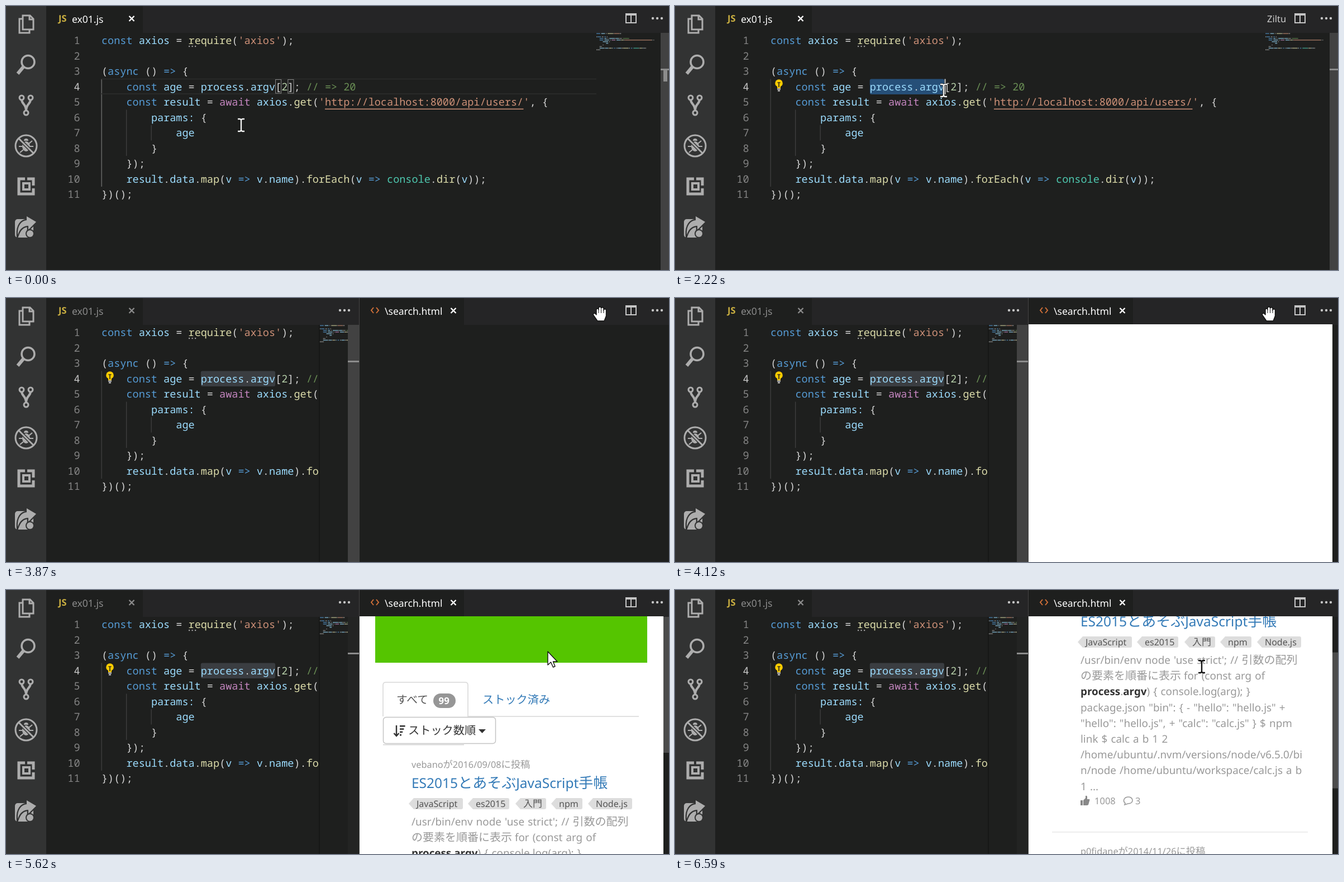
Write an HTML page with a canvas that moves like this. It is 1187 px wide and 472 px high and loops after 6650 ms.

```html
<!DOCTYPE html>
<html lang="ja">
<head>
<meta charset="utf-8">
<title>Editor search</title>
<style>
html, body { margin: 0; width: 100%; height: 100%; overflow: hidden; background: #1e1f1e; }
canvas { display: block; }
</style>
</head>
<body>
<canvas id="stage" width="1187" height="472"></canvas>
<script>
const ctx = document.getElementById('stage').getContext('2d');
const W = 1187, H = 472, LOOP = 6650;
const X0 = 171, CW = 11.11, TOP = 48, LINE = 27.5;
const BG = '#1e1f1e', BAR = '#252526', SIDE = '#323333', ICON = '#adadad';
const GREY = '#999', LINK = '#3794ff', BLUE = '#337ab7';
const MONO = '"Noto Sans Mono", "DejaVu Sans Mono", monospace';
const SANS = '"Noto Sans", "Open Sans", sans-serif';
const CJK = '"Noto Sans CJK JP", "Noto Sans CJK", sans-serif';

// ---------- code ----------
const source = `const axios = require('axios');

(async () => {
    const age = process.argv[2]; // => 20
    const result = await axios.get('http://localhost:8000/api/users/', {
        params: {
            age
        }
    });
    result.data.map(v => v.name).forEach(v => console.dir(v));
})();`.split('\n');
const TOKEN = /(\/\/.*)|('[^']*')|(const|async|=>)|(await)|(console)|(\w+(?=\())|(\d+)|([a-z]\w*:?)|(\S)/gi;
const palette = ['#6a8f55', '#ce9178', '#569cd6', '#c586c0', '#4ec9b0', '#dcdcaa', '#b5cea8', '#9cdcfe', '#d4d4d4'];
const tokens = source.flatMap((line, row) => [...line.matchAll(TOKEN)].map(m => ({
  row, col: m.index, text: m[0], color: palette[m.slice(1).findIndex(g => g !== undefined)]
})));
const rowTop = row => TOP + row * LINE;
const baseline = row => Math.round(rowTop(row) + 20);

// ---------- timing ----------
const bursts = [[90, 640, 8], [780, 1440, 10], [1530, 1580, 2], [1760, 1760, 1], [1910, 1970, 2],
  [2220, 2840, 9], [2910, 3530, 8], [3620, 3620, 1], [4980, 5620, 9], [5710, 6320, 9], [6410, 6590, 3]];
const mousePath = [[20, 421, 213], [640, 353, 151], [780, 353, 151], [1073, 412, 151], [1147, 414, 151],
  [1440, 463, 148], [1580, 474, 148], [1910, 476, 148], [1970, 478, 149], [2100, 478, 150], [2220, 481, 151],
  [2840, 995, 73], [3530, 1062, 16], [4980, 1062, 16], [5620, 970, 110], [6320, 947, 125], [6590, 943, 137]];
const scrollPath = [[5640, 0], [6320, 289]];
const shapes = [[0, 'beam'], [3000, 'arrow'], [3300, 'hand'], [3620, 'arrow'], [3870, 'hand'],
  [5050, 'arrow'], [6100, 'beam']];

function captured(t) {
  let out = 0;
  for (const [a, b, n] of bursts) {
    if (t < a) break;
    const d = n > 1 ? (b - a) / (n - 1) : 1;
    out = Math.min(b, a + Math.floor((t - a) / d + 1e-6) * d);
  }
  return out;
}

function along(path, t) {
  if (t <= path[0][0]) return path[0].slice(1);
  for (let i = 1; i < path.length; i++) {
    const [p, q] = [path[i - 1], path[i]];
    if (t <= q[0]) {
      const k = (t - p[0]) / (q[0] - p[0]);
      return q.slice(1).map((v, j) => p[j + 1] + (v - p[j + 1]) * k);
    }
  }
  return path[path.length - 1].slice(1);
}

// ---------- drawing helpers ----------
function rect(x, y, w, h, color) {
  ctx.fillStyle = color;
  ctx.fillRect(x, y, w, h);
}
function round(x, y, w, h, r, fill, stroke) {
  ctx.beginPath();
  ctx.roundRect(x, y, w, h, r);
  if (fill) { ctx.fillStyle = fill; ctx.fill(); }
  if (stroke) { ctx.strokeStyle = stroke; ctx.lineWidth = 1.5; ctx.stroke(); }
}
function dot(x, y, r, color) {
  ctx.fillStyle = color;
  ctx.beginPath();
  ctx.arc(x, y, r, 0, 7);
  ctx.fill();
}
function stroke(d, color, width) {
  ctx.strokeStyle = color;
  ctx.lineWidth = width;
  ctx.stroke(new Path2D(d));
}
function fill(d, color) {
  ctx.fillStyle = color;
  ctx.fill(new Path2D(d));
}
function clipped(x, y, w, h, draw) {
  ctx.save();
  ctx.beginPath();
  ctx.rect(x, y, w, h);
  ctx.clip();
  draw();
  ctx.restore();
}
// Mixed Latin and Japanese text centred on y; returns the right edge.
function label(s, x, y, size, color, { bold = false, link = false } = {}) {
  const base = Math.round(y + size * 0.35), start = x;
  ctx.fillStyle = color;
  ctx.wordSpacing = `${size * 0.06}px`;
  for (const run of s.match(/[\u3000-\u9fff]+|[^\u3000-\u9fff]+/g)) {
    const wide = run[0] >= '\u3000';
    const px = wide ? size : size * (bold ? 0.99 : 0.943);
    ctx.font = `${bold ? 'bold ' : ''}${px}px ${wide ? CJK : SANS}`;
    ctx.fillText(run, x, base);
    x += ctx.measureText(run).width;
  }
  ctx.wordSpacing = '0px';
  if (link) rect(start, base + Math.round(size * 0.12), x - start, Math.max(1.3, size * 0.08), color);
  return x;
}
function cross(x, color) {
  stroke(`M${x - 4.5} 18l9 9m0-9l-9 9`, color, 2.4);
}
function more(x) {
  for (const dx of [-8, 0, 8]) dot(x + dx, 22, 2.2, '#c5c5c5');
}

// ---------- activity bar ----------
function activityBar() {
  rect(0, 0, 72, H, SIDE);
  stroke('M30 23H24V48H42V43M30 17H43L49 23V42H30ZM42 17V24H49', ICON, 3);
  stroke('M51 100a11.5 11.5 0 1 1-23 0a11.5 11.5 0 1 1 23 0', ICON, 3.5);
  stroke('M31 109L21 121', ICON, 6);
  stroke('M28 167C28 176 36 174 36 188M44 167C44 176 36 174 36 188', ICON, 4);
  for (const [x, y] of [[28, 164], [44, 164], [36, 191]]) {
    dot(x, y, 5.5, ICON);
    dot(x, y, 2.4, SIDE);
  }
  fill('M29 251a7 9 0 1 1 14 0a7 9 0 1 1-14 0M32 241a4 4 0 0 1 8 0z', ICON);
  stroke('M23 251H49M25 241L31 246M47 241L41 246M25 262L31 257M47 262L41 257', ICON, 2.2);
  stroke('M23 237L49 263', SIDE, 6);
  stroke('M22.5 236.5L49.5 263.5M55 250a19 19 0 1 1-38 0a19 19 0 1 1 38 0', ICON, 3);
  stroke('M34 309H23V336H34M30 336H49V326M38 309H49V321', ICON, 5);
  stroke('M31 317H42V328H31Z', ICON, 4);
  round(16, 381, 33, 33, 5, ICON);
  const arrow = 'M37 376L54 386L40 400V393C31 393 25 398 21 409C20 393 27 384 37 383Z';
  stroke(arrow, SIDE, 4.5);
  fill(arrow, ICON);
  dot(43, 407, 8, SIDE);
  dot(43, 407, 6, ICON);
}

// ---------- editor ----------
function tabs(split, selecting) {
  rect(72, 0, W - 72, TOP, BAR);
  rect(72, 0, 173, TOP, BG);
  label('JS', 94, 22, 16.5, '#cbb041', { bold: true });
  label('ex01.js', 118, 23, 18.6, split ? '#8b8b8b' : '#fff');
  cross(225, split ? '#8b8b8b' : '#fff');
  if (split) {
    more(606);
    rect(633, 0, 187, TOP, BG);
    stroke('M658 17L654 22L658 27M663 17L667 22L663 27', '#d07038', 2);
    label('\\search.html', 678, 23, 18.6, '#fff');
    cross(801, '#fff');
  } else if (selecting) {
    label('Ziltu', 1060, 23, 17.5, '#ccc');
  }
  stroke('M1110 14H1128V30H1110ZM1119 14V30', '#c5c5c5', 2);
  rect(1109, 13, 20, 4, '#c5c5c5');
  more(1166);
}

function guides(active) {
  rect(170.5, rowTop(3), 1.3, LINE * 7, active ? '#707070' : '#404040');
  rect(215, rowTop(5), 1.3, LINE * 3, '#404040');
  rect(259.5, rowTop(6), 1.3, LINE, '#404040');
}

function code(t, sel, split) {
  const idle = !sel, y = rowTop(3);
  guides(idle);
  if (idle) {
    rect(X0, y - 1, 886, 2, '#292a29');
    rect(X0, y + LINE - 2, 886, 2, '#292a29');
    if (t < 780) for (const col of [28, 30]) {
      ctx.strokeStyle = '#888';
      ctx.lineWidth = 1;
      ctx.strokeRect(X0 + col * CW + 0.5, y + 1, CW - 1, LINE - 3);
    }
  } else {
    round(X0 + 16 * CW, y, sel * CW, LINE, 3, split ? '#3a3d41' : '#264f78');
  }
  ctx.font = `18.5px ${MONO}`;
  for (const k of tokens) {
    ctx.fillStyle = k.color;
    ctx.fillText(k.text, X0 + k.col * CW, baseline(k.row));
  }
  rect(X0 + 36 * CW, 183.5, 32 * CW, 1.5, '#ce9178');
  for (let i = 0; i < 3; i++) rect(327 + i * 5.5, 71, 2.2, 2.2, '#a0a0a0');
  const caretOn = t < 2910 || t > 3400;
  if (sel && !split && caretOn) rect(X0 + (16 + sel) * CW + 0.5, y, 2, LINE, '#c8c8c8');
  if (t >= 2220) bulb();
}

function bulb() {
  dot(186, 138, 6.8, '#ffcc00');
  rect(183, 142, 6, 5, '#ffcc00');
  stroke('M183.5 137H188.5M186 138V145', BG, 1.6);
  stroke('M183 148.5H189M184 151.5H188', '#d4d4d4', 1.8);
}

function lineNumbers() {
  ctx.font = `18.5px ${MONO}`;
  ctx.textAlign = 'right';
  source.forEach((_, i) => {
    ctx.fillStyle = i === 3 ? '#c6c6c6' : '#858585';
    ctx.fillText(i + 1, 132.5, baseline(i));
  });
  ctx.textAlign = 'left';
}

function minimap(x) {
  ctx.globalAlpha = 0.65;
  for (const k of tokens) rect(x + k.col * 1.44, 48.5 + k.row * 2.9, k.text.length * 1.44 - 0.4, 1.6, k.color);
  ctx.globalAlpha = 1;
}

function editor(t, sel, split) {
  const right = split ? 562 : 1057, ruler = split ? 612 : 1172;
  const rulerWidth = split ? 20 : 15;
  lineNumbers();
  clipped(72, TOP, right - 72, H - TOP, () => code(t, sel, split));
  if (split) rect(560, TOP, 2, H - TOP, '#171817');
  clipped(right, TOP, ruler - right, H - TOP, () => minimap(right));
  rect(ruler, TOP, rulerWidth, H - TOP, t < 4520 ? '#424242' : '#232423');
  rect(ruler, 112, rulerWidth, 3, '#8c8c8c');
  if (!sel) rect(1177, 115, 7, 20, '#8c8c8c');
}

// ---------- preview ----------
const title = ['ES2015とあそぶJavaScript', '手帳'];
const excerpt = ["/usr/bin/env node 'use strict'; // 引数の配列", 'の要素を順番に表示 for (const arg of', '',
  'package.json "bin": { - "hello": "hello.js" +', '"hello": "hello.js", + "calc": "calc.js" } $ npm',
  'link $ calc a b 1 2', '/home/ubuntu/.nvm/versions/node/v6.5.0/bi',
  'n/node /home/ubuntu/workspace/calc.js a b', '1 ...'];
const tags = [['JavaScript', 721, 818], ['es2015', 827, 901], ['入門', 912, 967], ['npm', 976, 1032], ['Node.js', 1042, 1121]];

function plainPage() {
  const items = [['すべて 99', 80], ['ストック済み', 108], ['新着順', 202], ['関連順', 230], ['ストック数順', 258]];
  for (const [s, y] of items) {
    dot(707, y + 1, 3.2, '#333');
    label(s, 719, y, 18.7, LINK, { link: true });
  }
  label('ストック数順', 661, 155, 18.7, LINK, { link: true });
  const x = label('vebano', 661, 305, 18.7, LINK, { link: true });
  label('が2016/09/08に投稿', x, 305, 18.7, '#333');
  title.forEach((s, i) => label(s, 661, 373 + i * 57, 37, LINK, { bold: true, link: true }));
}

function styledPage() {
  rect(661, 47, 487, 83, '#55c500');
  stroke('M675 226V170q0-5 5-5H822q5 0 5 5V226H1133', '#d8d8d8', 1.5);
  label('すべて', 699, 196, 19.7, '#555');
  round(765, 185, 40, 26, 13, '#969696');
  label('99', 774.5, 198, 17, '#fff', { bold: true });
  label('ストック済み', 853, 196, 20.2, BLUE);
  rect(675, 276, 145, 1.3, '#ccc');
  round(675.5, 227.5, 201, 47, 5, '#fff', '#c4c4c4');
  stroke('M699 242V260M694.5 256L699 261L703.5 256', '#333', 2.4);
  for (let i = 0; i < 4; i++) rect(705, 242 + i * 5.3, 3 + (3 - i) * 2.2, 2.6, '#333');
  label('ストック数順', 720, 251, 20.2, '#333');
  fill('M846 249H859L852.5 256Z', '#333');

  label('vebanoが2016/09/08に投稿', 726, 312, 17.3, GREY);
  label(title.join(''), 726, 345, 26, BLUE);
  for (const [s, a, b] of tags) {
    fill(`M${a} 382L${a + 9} 372H${b - 3}q3 0 3 3V389q0 3-3 3H${a + 9}Z`, '#ddd');
    label(s, a + 14, 382, 17, '#555');
  }
  const lineY = i => 414 + i * 28.2;
  excerpt.forEach((s, i) => s && label(s, 726, lineY(i), 20, GREY));
  let x = label('process', 726, lineY(2), 19, '#333', { bold: true });
  x = label('.', x, lineY(2), 20, GREY);
  x = label('argv', x, lineY(2), 19, '#333', { bold: true });
  label(') { console.log(arg); }', x, lineY(2), 20, GREY);

  fill('M726 665h4v9h-4zM731 665l4-4v-4q3-1 3 2v4h4q1 1 0 3l-2 7q-1 1-3 1h-6z', '#888');
  label('1008', 751, 666, 17.5, GREY);
  stroke('M806 670C801 666 804 659 812 659C821 659 822 671 811 671L805 673Z', GREY, 1.6);
  label('3', 824, 666, 17.5, GREY);
  rect(675, 721, 458, 1.5, '#e8e8e8');
  label('p0fidaneが2014/11/26に投稿', 726, 756, 17.3, GREY);
}

function preview(t, scroll) {
  rect(633, TOP, W - 633, H - TOP, BG);
  if (t >= 4120) {
    rect(633, 47, 544, H - 47, '#fff');
    clipped(633, 47, 544, H - 47, () => {
      ctx.translate(0, -Math.round(scroll));
      if (t >= 4980) styledPage();
      else if (t >= 4740) plainPage();
    });
    if (t >= 4980) rect(1177, TOP + scroll * 0.22, 10, 243, '#4c4c4c');
    else if (t >= 4740) rect(1177, TOP, 10, 184, '#4c4c4c');
  }
  rect(632, 0, 1, H, '#444');
}

// ---------- mouse ----------
function mouse(t, x, y) {
  const kind = shapes.filter(s => t >= s[0]).pop()[1];
  if (t >= 780 && t < 2220) dot(x - 1, y - 1, 17, 'rgba(255,240,0,.55)');
  ctx.save();
  ctx.translate(Math.round(x), Math.round(y));
  ctx.lineJoin = 'round';
  if (kind === 'beam') {
    const d = 'M-6-11H-2L0-9.5L2-11H6M0-10V10M-6 11H-2L0 9.5L2 11H6';
    const dark = t > 4120;
    if (!dark) stroke(d, '#111', 4);
    stroke(d, dark ? '#111' : '#f4f4f4', 2.4);
  } else {
    const d = kind === 'arrow'
      ? 'M0 0V24L5.5 19L9.5 28L13 26.5L9.5 18H17Z'
      : 'M-5 14V5a2 2 0 0 1 4 0V2a2 2 0 0 1 4.5 0v1a2 2 0 0 1 4.5 0v3a2 2 0 0 1 4.5 0v10l-3.5 9h-12l-7-10a2 2 0 0 1 3-3z';
    fill(d, '#fff');
    stroke(d, '#111', 1.4);
    if (kind === 'hand') stroke('M-1 5V11M3.5 4V11M8 6V11', '#111', 1);
  }
  ctx.restore();
}

function draw(t) {
  const at = captured(t);
  const [x, y] = along(mousePath, at);
  const split = t >= 3620;
  let sel = 0;
  if (t >= 1530) sel = 12;
  else if (t >= 780) sel = Math.max(0, Math.floor((x - X0) / CW - 16));
  ctx.textRendering = 'geometricPrecision';
  rect(0, 0, W, H, BG);
  tabs(split, sel > 0);
  editor(t, sel, split);
  if (split) preview(t, along(scrollPath, at)[0]);
  activityBar();
  mouse(t, x, y);
}

function tick() {
  draw(performance.now() % LOOP);
  requestAnimationFrame(tick);
}
tick();
</script>
</body>
</html>
```
